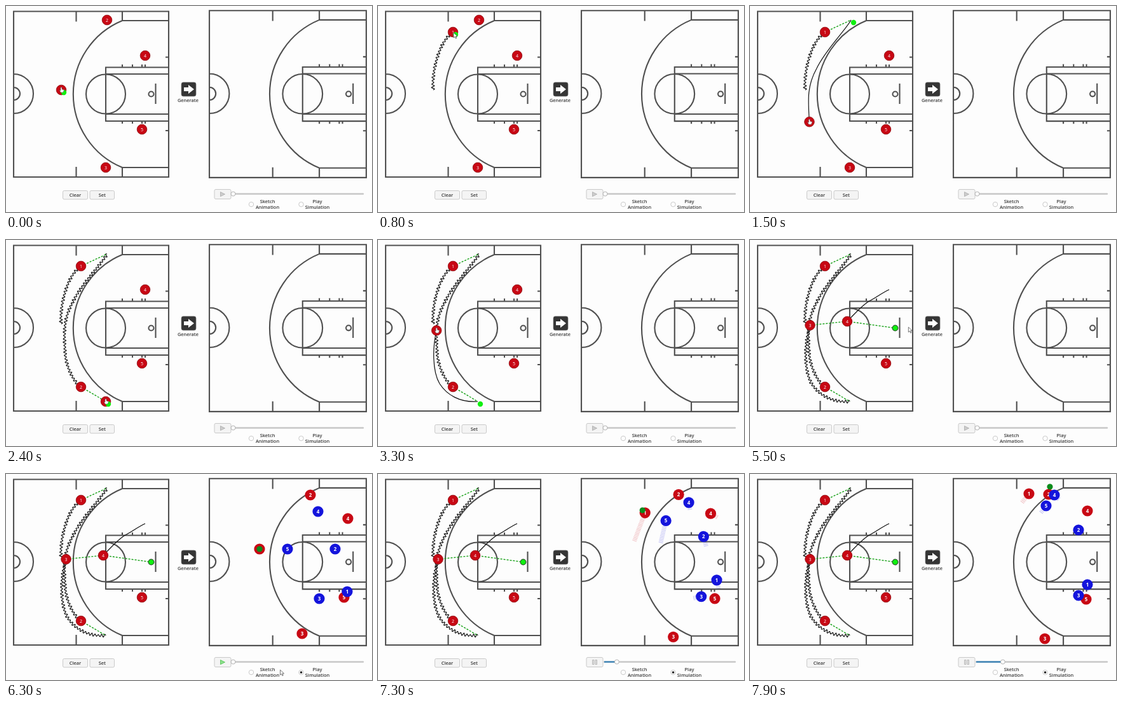
These frames come from a looping animation (576 by 324 pixels, 8 s). An HTML page:

```html
<!DOCTYPE html>
<html lang="en">
<head>
<meta charset="utf-8">
<title>Play sketching</title>
<style>
html, body { margin: 0; width: 100%; height: 100%; overflow: hidden; background: #fdfdfd; }
svg { display: block; width: 576px; height: 324px; }
text { font-family: "Open Sans", "Noto Sans", sans-serif; font-weight: 600; font-size: 7.4px; fill: #383838; text-anchor: middle; }
.token { font-size: 7px; font-weight: 400; fill: #fff; }
.sim { font-size: 8px; font-weight: 700; fill: #fff; }
</style>
</head>
<body>
<svg id="stage" viewBox="0 0 576 324"></svg>
<script>
const LOOP = 8000, STEP = 100, RED = '#c80814', BLUE = '#1414dc';
const GENERATED = 5800, SELECTED = 6200, SIM_START = 6800;
const stage = document.getElementById('stage');

function el(tag, attrs, parent = stage, text) {
  const node = document.createElementNS('http://www.w3.org/2000/svg', tag);
  set(node, attrs);
  if (text !== undefined) node.textContent = text;
  return parent.appendChild(node);
}
function set(node, attrs) {
  for (const key in attrs) node.setAttribute(key, attrs[key]);
}
const show = (node, on) => node.setAttribute('visibility', on ? 'visible' : 'hidden');
const place = (node, [x, y]) => node.setAttribute('transform', `translate(${x.toFixed(2)} ${y.toFixed(2)})`);
const mix = (a, b, u) => a.map((v, i) => v + (b[i] - v) * u);
const shift = (p, d) => p.map(v => v + d);
const ramp = (t, from, to) => Math.max(0, Math.min(1, (t - from) / (to - from)));

function court(transform) {
  const g = el('g', { transform, fill: 'none', stroke: '#505050', 'stroke-width': 2.1 });
  const keyTicks = [183, 199, 214, 219].map(x => `M${x} 92v4M${x} 181v4`).join('');
  el('path', { d: 'M12 8.5H256V269H12Z M110.5 8.5v16M110.5 253v16 M183 8.5V23H256 M183 269V254H256' +
    'M183 23A125 125 0 0 0 183 254 M256 96.5H157V181H256 M157 107H256M157 170H256' +
    'M12 107A31 31 0 0 1 12 169 M12 128A10 10 0 0 1 12 148 M251 80.5h5M251 196h5 M235.5 122v32' + keyTicks }, g);
  el('circle', { cx: 157, cy: 138.5, r: 31 }, g);
  el('circle', { cx: 228.5, cy: 138.5, r: 4 }, g);
}

function token(label, color, cls) {
  const sim = cls === 'sim', g = el('g', {});
  el('circle', { r: sim ? 8.6 : 7.8, fill: color, stroke: sim ? 'none' : '#8c0c10', 'stroke-width': 0.8 }, g);
  el('text', { class: cls, y: sim ? 2.8 : 2.5 }, g, label);
  return g;
}

function button(x, y, w, h, label) {
  el('rect', { x, y, width: w, height: h, rx: 2, fill: '#f4f4f4', stroke: '#c4c4c4', 'stroke-width': 0.9 });
  if (label) el('text', { x: x + w / 2, y: y + 9.7 }, stage, label);
}

function radio(x, lines) {
  el('circle', { cx: x, cy: 312, r: 3.7, fill: '#fff', stroke: '#bbb', 'stroke-width': 0.8 });
  lines.forEach((line, i) => el('text', { x: x + 25.5, y: 310 + i * 8.6 }, stage, line));
}

court('');
court('translate(307.9 -1.3) scale(1.012 1.008)');

el('rect', { x: 276, y: 120, width: 23, height: 22, rx: 3, fill: '#353535', stroke: '#777', 'stroke-width': 0.7 });
el('path', { d: 'M280 128h7v-4l9 7-9 7v-4h-7z', fill: '#fff' });
el('text', { x: 286.5, y: 151 }, stage, 'Generate');
button(89.5, 290.5, 39, 13.5, 'Clear');
button(132, 290.5, 38.5, 13.5, 'Set');
button(328, 288.5, 26, 15);
const playIcon = el('path', { d: 'M337.5 292.5l7 3.5-7 3.5z', 'stroke-width': 0.8 });
const pauseIcon = el('path', { d: 'M337.5 292.5h2.5v7h-2.5zM342 292.5h2.5v7h-2.5z', fill: '#ddd', stroke: '#aaa', 'stroke-width': 0.7 });
el('path', { d: 'M356 295.5H562', stroke: '#c8c8c8', 'stroke-width': 2.4, 'stroke-linecap': 'round' });
const progress = el('path', { stroke: '#3f86b8', 'stroke-width': 2.4 });
const knob = el('circle', { r: 3.4, cy: 295.5, fill: '#fff', stroke: '#aaa', 'stroke-width': 0.9 });
radio(386, ['Sketch', 'Animation']);
radio(464.5, ['Play', 'Simulation']);
const radioDot = el('circle', { cx: 464.5, cy: 312, r: 1.8, fill: '#222' });

// Sketch side: the cursor drags players and the ball, then clicks buttons.
const GRIP = 4;
const drag = (id, from, to, d, withBall = true) => ({ kind: 'drag', id, from, to, d, withBall });
const pass = (giver, taker, from, to) => ({ kind: 'pass', giver, taker, from, to });
const click = (from, to, x, y) => ({ kind: 'click', from, to, start: [x, y], end: [x, y] });
const HOOP = [228.5, 138.5];
const actions = [
  drag(1, 0, 800, 'M87 132C84 112 93 58 118 41'),
  pass(1, 2, 850, 950),
  drag(2, 1050, 1640, 'M159 22C152 36 118 70 105 98C90 125 91 145 93.5 183C97 205 108 225 118 231'),
  pass(2, 3, 1900, 2300),
  drag(3, 2400, 3350, 'M157 254C128 256 108 243 97 226C84 204 86 160 94.5 134'),
  drag(4, 3750, 4200, 'M219 78C206 84 200 90 186 97C172 107 166 115 153 128', false),
  pass(3, 4, 4650, 4950),
  pass(4, 'hoop', 5000, 5400),
  click(5700, GENERATED, 288, 131),
  click(6100, SELECTED, 465, 311),
  click(6560, SIM_START, 341, 297)
];

function wavy(path) {
  const length = path.getTotalLength(), points = [];
  for (let s = 0; s <= length; s += 0.8) {
    const p = path.getPointAtLength(s), q = path.getPointAtLength(s + 0.5), o = path.getPointAtLength(s - 0.5);
    const n = Math.hypot(q.x - o.x, q.y - o.y) || 1;
    const off = (1.9 + 0.5 * Math.sin(s * 0.37)) * Math.sin(s * 1.2);
    points.push(`${(p.x - (q.y - o.y) / n * off).toFixed(1)} ${(p.y + (q.x - o.x) / n * off).toFixed(1)}`);
  }
  return 'M' + points.join('L');
}

const spots = { 5: [214, 194], hoop: HOOP };
for (const act of actions.filter(a => a.kind === 'drag')) {
  const style = { fill: 'none', stroke: '#111', 'stroke-width': 1.2 };
  act.line = el('path', { ...style, d: act.d });
  act.length = act.line.getTotalLength();
  act.point = u => {
    const p = act.line.getPointAtLength(act.length * u);
    return [p.x, p.y];
  };
  act.start = act.point(0);
  act.end = act.point(1);
  spots[act.id] = act.start;
  if (act.withBall) act.wave = el('path', { ...style, d: wavy(act.line) });
}
const home = { ...spots };
for (const act of actions) {
  if (act.kind === 'drag') spots[act.id] = act.end;
  if (act.kind !== 'pass') continue;
  act.start = spots[act.giver];
  act.end = spots[act.taker];
  act.line = el('path', { stroke: '#16a016', 'stroke-width': 1.4, 'stroke-dasharray': '3 2' });
}

const players = [1, 2, 3, 4, 5].map(id => token(id, RED, 'token'));
place(players[4], home[5]);
const ball = el('circle', { r: 4.2, fill: '#10f010' });

function renderSketch(t) {
  let ballAt = shift(home[1], GRIP), cursor, holding = false, last = actions[0];
  for (const act of actions) {
    const { kind, from, to, start, end, line } = act;
    const u = ramp(t, from, to), active = t >= from && t < to;
    let grabbed = start;
    if (kind === 'drag') {
      grabbed = act.point(u);
      place(players[act.id - 1], grabbed);
      set(line, { 'stroke-dasharray': `${act.length * u} 999` });
      show(line, u > 0 && !(u === 1 && act.wave));
      if (act.wave) show(act.wave, u === 1);
      if (u === 1 && act.withBall) ballAt = shift(end, GRIP);
    } else if (kind === 'pass') {
      grabbed = mix(start, end, u);
      set(line, { d: `M${start}L${grabbed}` });
      show(line, u > 0);
      if (t >= from) ballAt = mix(shift(start, GRIP), act.taker === 'hoop' ? end : shift(end, GRIP), u);
    }
    if (active) {
      cursor = grabbed;
      holding = kind !== 'click';
    } else if (t < from && !cursor) {
      cursor = mix(last.end, start, ramp(t, last.to, from));
    }
    last = act;
  }
  cursor = shift(cursor || last.end, 1);
  place(ball, ballAt);
  set(ball, { stroke: ballAt[0] === HOOP[0] ? '#287028' : 'none' });
  place(hand, cursor);
  place(arrow, cursor);
  show(hand, holding);
  show(arrow, !holding && t < SIM_START);
}

// Simulation side: everyone eases from start to end, some bowing out on the way.
const mover = (label, color, start, end, bow = [0, 0]) => ({ label, color, start, end, bow });
const movers = [
  mover(1, RED, [399, 118], [439, 31], [-5, 0]),
  mover(2, RED, [479, 33], [470, 32]),
  mover(3, RED, [466, 251], [464, 259]),
  mover(4, RED, [538, 70], [531, 58], [-10, 0]),
  mover(5, RED, [532, 194], [529, 197]),
  mover(1, BLUE, [537, 185], [531, 174], [0, -11]),
  mover(2, BLUE, [518, 118], [517, 88], [-5, 0]),
  mover(3, BLUE, [493, 196], [517, 191]),
  mover(4, BLUE, [491, 59], [479, 33], [6, 3]),
  mover(5, BLUE, [443, 118], [466, 50], [-5, 0])
];
function moverAt({ start, end, bow }, t) {
  const u = ramp(t, SIM_START, 7900);
  const out = Math.sin(u * Math.PI);
  return mix(start, end, Math.sin(u * Math.PI / 2)).map((v, i) => v + bow[i] * out);
}

const simLayer = el('g', {});
for (const m of movers)
  m.trail = el('path', { stroke: m.color, 'stroke-width': 7, 'stroke-dasharray': '1.5 1', opacity: 0.18 }, simLayer);
for (const m of movers)
  simLayer.appendChild(m.node = token(m.label, m.color, 'sim'));
const simBall = el('circle', { r: 4.6, fill: '#0c8c1c' }, simLayer);

function renderSimulation(t) {
  simLayer.setAttribute('display', t >= GENERATED ? 'inline' : 'none');
  for (const m of movers) {
    const now = moverAt(m, t);
    place(m.node, now);
    set(m.trail, { d: `M${moverAt(m, t - 400)}L${now}` });
  }
  const carried = shift(moverAt(movers[0], t), -4 * ramp(t, SIM_START, 7200));
  const [x, y] = movers[1].end;
  place(simBall, mix(carried, [x + 2, y - 12], ramp(t, 7500, 7900)));

  const playing = t >= SIM_START, knobX = 357.5 + Math.max(0, t - SIM_START) * 0.0367;
  set(knob, { cx: knobX });
  set(progress, { d: `M356 295.5H${knobX}` });
  show(progress, playing);
  show(playIcon, !playing);
  show(pauseIcon, playing);
  set(playIcon, t >= GENERATED ? { fill: '#8ce08c', stroke: '#50c050' } : { fill: '#ccc', stroke: '#aaa' });
  show(radioDot, t >= SELECTED);
}

const hand = el('path', { d: 'M-2 -5v5l-2-1 2 4h4l1.5-4-3.5-1v-3z', fill: '#fff', stroke: '#444', 'stroke-width': 0.5 });
const arrow = el('path', { d: 'M0 0v8l2-1.8 1.3 3 1.4-.6-1.3-2.9h2.6z', fill: '#fff', stroke: '#555', 'stroke-width': 0.8 });

function render(elapsed) {
  const t = Math.floor(elapsed % LOOP / STEP) * STEP;
  renderSketch(t);
  renderSimulation(t);
}

let origin;
function tick(now) {
  origin ??= now;
  render(now - origin);
  requestAnimationFrame(tick);
}
render(0);
requestAnimationFrame(tick);
</script>
</body>
</html>
```
